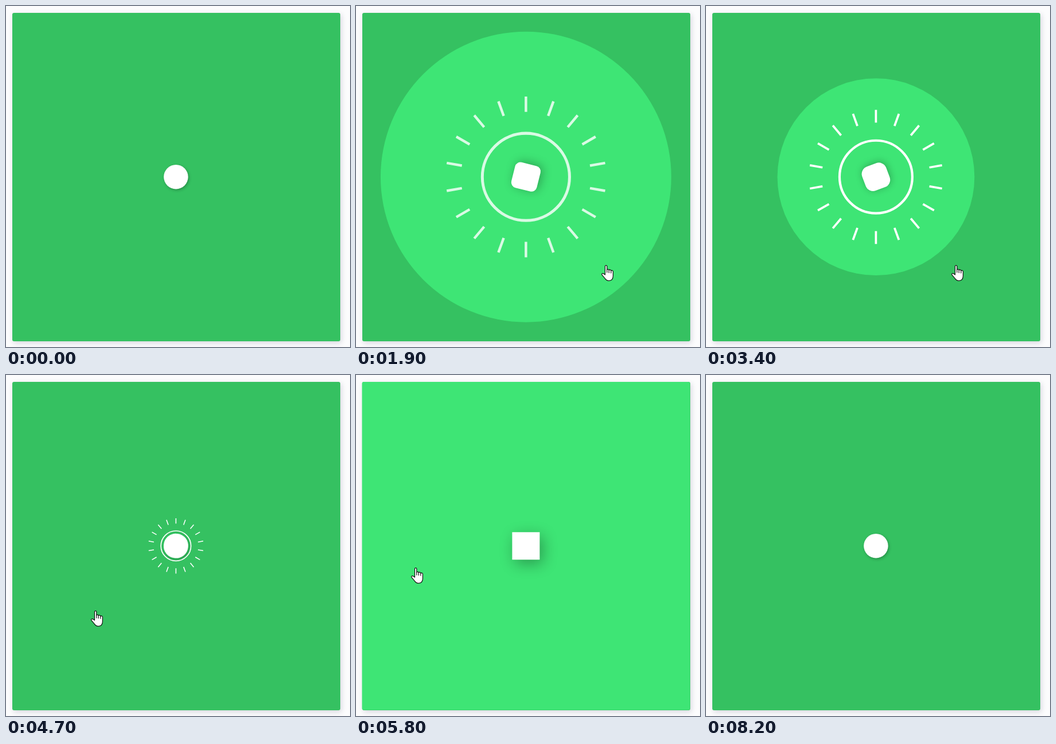
An HTML page with a canvas for the animation above (8.3 s loop, 600x595 px).

```html
<!DOCTYPE html>
<html lang="en">
<head>
<meta charset="utf-8">
<title>Toggle</title>
<style>
  html, body { margin: 0; width: 100%; height: 100%; overflow: hidden; background: #fcfcfd; }
  .card {
    position: absolute; left: 10.5px; top: 12px; width: 572px; height: 572.5px;
    border-radius: 3px; background: #35c161;
    box-shadow: 2px 3px 10px rgba(30, 30, 70, .17);
  }
  canvas { position: absolute; left: 0; top: 0; }
</style>
</head>
<body>
<div class="card"></div>
<canvas id="stage" width="600" height="595"></canvas>
<script>
const ctx = document.getElementById('stage').getContext('2d');
const LOOP = 8300, STEP = 100, SPAN = 700;
const CX = 296.4, CY = 298.2;

// Clicks that flip the toggle on and off in turn
const clicks = [1666, 3151, 3750, 4170, 4850, 6000];

// Pointer tip: time, x, y
const path = [
  [0, 520, 640], [300, 541, 580], [600, 556, 525], [900, 555, 477],
  [1400, 436, 452], [3500, 436, 452], [4200, 215, 440], [4700, 156, 411],
  [5300, 112, 352], [5600, 104, 336], [5900, 104, 336], [6400, 102, 312],
  [6900, 102, 312], [7100, 122, 200], [7300, 172, 41], [7400, 185, -50]
];

const hand = new Path2D(
  'M6.5 17V2.3Q6.5.6 8.1.6Q9.8.6 9.8 2.3V8.5Q10 7.4 11.4 7.4Q13 7.4 13.2 9' +
  'Q13.6 8 15 8.2Q16.6 8.4 16.8 10Q17.2 9.2 18.6 9.4Q20.4 9.7 20.4 11.6V19' +
  'Q20.2 27.3 13 27.3Q9 27.3 6.5 23.6L1 17.2Q.2 15.6 1.4 14.8Q3 14 4.6 15.5Z');
const creases = new Path2D('M9.8 8.5V13M13.2 9V13.5M16.8 10V14');

const clamp = v => Math.max(0, Math.min(1, v));
const mix = (a, b, k) => a + (b - a) * k;

// cubic-bezier(.25, .1, .25, 1)
function ease(x) {
  if (x <= 0 || x >= 1) return clamp(x);
  let lo = 0, hi = 1;
  const curve = (u, a, b) => 3 * u * (1 - u) ** 2 * a + 3 * u * u * (1 - u) * b + u ** 3;
  for (let i = 0; i < 24; i++) {
    const mid = (lo + hi) / 2;
    if (curve(mid, .25, .25) < x) lo = mid; else hi = mid;
  }
  return curve(lo, .1, 1);
}

function progress(t) {
  let p = 0;
  clicks.forEach((start, i) => {
    if (t < start) return;
    const end = i + 1 < clicks.length ? Math.min(t, clicks[i + 1]) : t;
    p = mix(p, i % 2 ? 0 : 1, ease((end - start) / SPAN));
  });
  return p;
}

function pointer(t) {
  const i = path.findIndex(k => k[0] > t);
  if (i < 1) return null;
  const [t0, x0, y0] = path[i - 1], [t1, x1, y1] = path[i];
  const k = (t - t0) / (t1 - t0);
  return [mix(x0, x1, k), mix(y0, y1, k)];
}

function disc(r, color) {
  ctx.fillStyle = color;
  ctx.beginPath();
  ctx.arc(0, 0, r, 0, Math.PI * 2);
  ctx.fill();
}

function drawBurst(p) {
  const r = 22.5 + 141 * p - 76 * p * p;
  ctx.globalAlpha = clamp(p / .02) * clamp((.98 - p) / .5);
  ctx.strokeStyle = '#fff';
  ctx.lineWidth = r * .064;
  ctx.beginPath();
  ctx.arc(0, 0, r * .968, 0, Math.PI * 2);
  ctx.stroke();
  ctx.lineWidth = r * .057;
  ctx.beginPath();
  for (let i = 0; i < 18; i++) {
    const a = i * Math.PI / 9, s = Math.sin(a) * r, c = -Math.cos(a) * r;
    ctx.moveTo(s * 1.443, c * 1.443);
    ctx.lineTo(s * 1.785, c * 1.785);
  }
  ctx.stroke();
  ctx.globalAlpha = 1;
}

function drawKnob(p) {
  const size = mix(42.5, 48, p), turn = Math.PI * p;
  const dx = mix(1.5, -5, p), dy = mix(2, -7, p);
  const s = Math.sin(turn), c = Math.cos(turn);
  ctx.save();
  ctx.shadowColor = `rgba(0, 0, 0, ${mix(.25, .32, p)})`;
  ctx.shadowBlur = mix(5, 26, p);
  ctx.shadowOffsetX = dx * c - dy * s;
  ctx.shadowOffsetY = dx * s + dy * c;
  ctx.rotate(turn);
  ctx.fillStyle = '#fff';
  ctx.beginPath();
  ctx.roundRect(-size / 2, -size / 2, size, size, size / 2 * (1 - p));
  ctx.fill();
  ctx.restore();
}

function drawPointer(t) {
  const at = pointer(t);
  if (!at) return;
  ctx.save();
  ctx.translate(at[0] - 8, at[1]);
  ctx.lineJoin = ctx.lineCap = 'round';
  ctx.lineWidth = 1.2;
  ctx.fillStyle = '#fff';
  ctx.strokeStyle = '#111';
  ctx.fill(hand);
  ctx.stroke(hand);
  ctx.stroke(creases);
  ctx.restore();
}

function draw(t) {
  const p = progress(t);
  ctx.clearRect(0, 0, 600, 595);
  ctx.save();
  ctx.beginPath();
  ctx.roundRect(10.5, 12, 572, 572.5, 3);
  ctx.clip();
  ctx.translate(CX, CY);
  if (p > 0) {
    disc(8 + 425 * p, '#3ee575');
    drawBurst(p);
  }
  drawKnob(p);
  ctx.restore();
  drawPointer(t);
}

const begin = performance.now();
function tick() {
  const t = (performance.now() - begin) % LOOP;
  draw(Math.floor(t / STEP) * STEP);
  requestAnimationFrame(tick);
}
tick();
</script>
</body>
</html>
```
